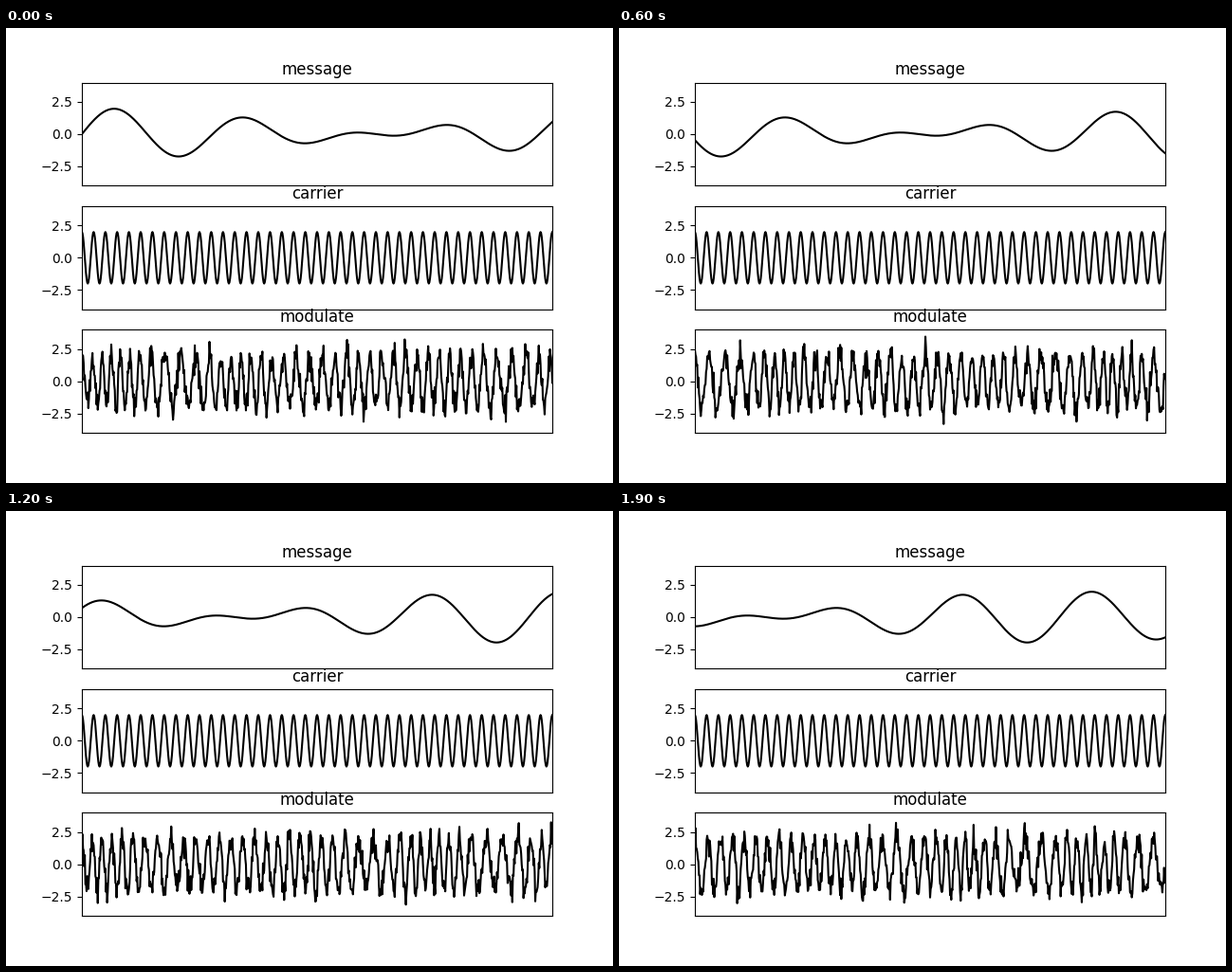
Animation of 640x480 px, one loop 2000 ms. Source, as a matplotlib script:

```python
import numpy as np
import matplotlib.pyplot as plt
from matplotlib.animation import FuncAnimation

FRAMES, INTERVAL = 20, 100
SPAN, STEP = 0.8, 0.02        # seconds shown, seconds scrolled per frame
TONES = (5, 4)                # Hz
CARRIER = 50                  # Hz
DEVIATION = 50                # rad/s per unit of message
NOISE = 0.5

t = np.linspace(0, SPAN, 801)


def message(time):
    return sum(np.sin(2 * np.pi * f * time) for f in TONES)


def message_area(time):
    """Integral of the message from zero."""
    return sum((1 - np.cos(2 * np.pi * f * time)) / (2 * np.pi * f) for f in TONES)


def waves(frame):
    start = frame * STEP
    now = start + t
    phase = 2 * np.pi * CARRIER * t
    shift = DEVIATION * (message_area(now) - message_area(start))
    noise = np.random.default_rng(100 + frame).normal(0, NOISE, t.size)
    return message(now), 2 * np.cos(phase), 2 * np.cos(phase + shift) + noise


fig, axes = plt.subplots(3, 1, figsize=(6.4, 4.8), dpi=100)
lines = []
for ax, name in zip(axes, ("message", "carrier", "modulate")):
    ax.set_title(name)
    ax.set_xlim(0, SPAN)
    ax.set_ylim(-4, 4)
    ax.set_xticks([])
    ax.set_yticks([-2.5, 0, 2.5])
    lines += ax.plot([], [], color="black", lw=1.5)


def update(frame):
    for line, y in zip(lines, waves(frame)):
        line.set_data(t, y)
    return lines


anim = FuncAnimation(fig, update, frames=FRAMES, interval=INTERVAL,
                     init_func=lambda: update(0), repeat=True, repeat_delay=0)
plt.show()
```
